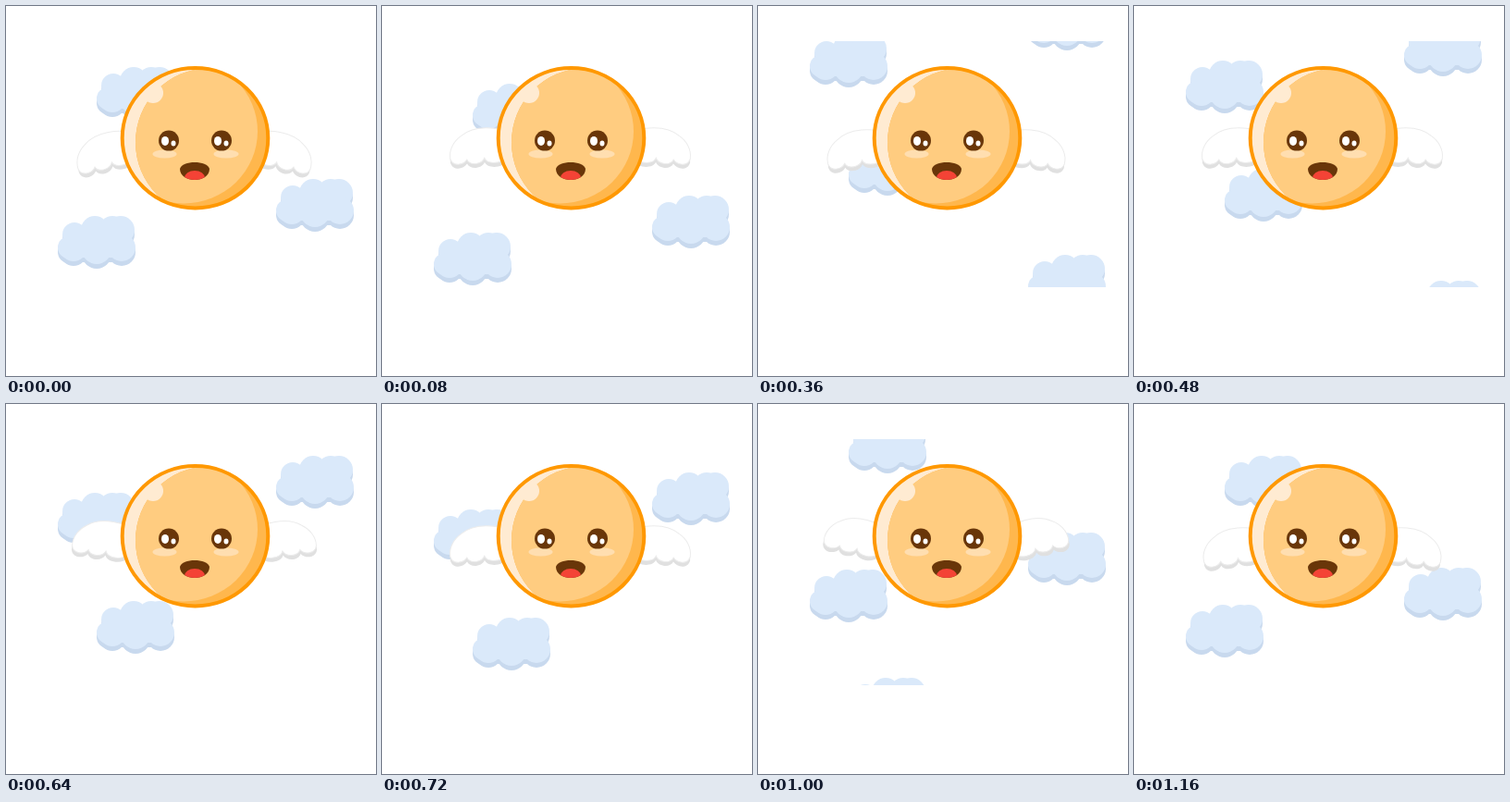
An HTML page for the animation above (1.2 s loop, 400 px wide and 400 px high).

```html
<!DOCTYPE html>
<html lang="en">
<head>
<meta charset="utf-8">
<title>Flying sun</title>
<style>
  html, body { margin: 0; width: 100%; height: 100%; overflow: hidden; background: #fff; }
  svg { display: block; width: 100vw; height: 100vh; }
</style>
</head>
<body>
<svg viewBox="0 0 400 400">
  <defs>
    <clipPath id="sky"><rect x="56" y="38" width="320" height="266"/></clipPath>
    <clipPath id="disc"><ellipse cx="204.5" cy="142.7" rx="78.5" ry="75.5"/></clipPath>
    <path id="mouth" d="M188 176C190 166.5 218 166.5 220 176C220 192 188 192 188 176Z"/>
    <clipPath id="lips"><use href="#mouth"/></clipPath>
    <g id="puff">
      <circle cx="12" cy="34" r="12"/>
      <circle cx="18" cy="20" r="13"/>
      <circle cx="40" cy="15" r="15"/>
      <circle cx="59" cy="14" r="14"/>
      <circle cx="68" cy="15" r="15"/>
      <circle cx="69" cy="34" r="15"/>
      <circle cx="42" cy="36" r="16"/>
      <circle cx="17" cy="35" r="14"/>
      <rect x="12" y="15" width="58" height="30"/>
    </g>
    <g id="cloud">
      <use href="#puff" y="5" fill="#c8d9ee"/>
      <use href="#puff" fill="#dae9fa"/>
    </g>
    <path id="feathers" d="M140 139C128 129 100 127 86 138C78 143 72 152 73 162C75 171 87 170 91 164C94 171 107 170 110 163C113 171 130 170 134 163Z"/>
    <g id="wing">
      <use href="#feathers" y="4.5" fill="#e0e0e0"/>
      <use href="#feathers" fill="#fff" stroke="#ececec"/>
    </g>
    <g id="eye">
      <circle r="11" fill="#693609"/>
      <ellipse cx="-4" cy="0.3" rx="4" ry="5" fill="#fff"/>
      <ellipse cx="5" cy="2.8" rx="2.5" ry="3" fill="#fff"/>
    </g>
  </defs>

  <g id="clouds" clip-path="url(#sky)"></g>

  <g id="left"><use href="#wing"/></g>
  <g transform="translate(407 0) scale(-1 1)"><g id="right"><use href="#wing"/></g></g>

  <g clip-path="url(#disc)">
    <rect x="120" y="60" width="170" height="165" fill="#ffebd2"/>
    <ellipse cx="219" cy="147.4" rx="79" ry="80" fill="#ffb74d"/>
    <rect x="219" y="60" width="70" height="165" fill="#ffb74d"/>
    <clipPath id="body"><path d="M219 60V67.4A79 80 0 0 0 219 227.4H300V60Z"/></clipPath>
    <ellipse cx="192" cy="135.5" rx="80" ry="78" fill="#ffcc80" clip-path="url(#body)"/>
    <circle cx="159" cy="94" r="11" fill="#ffebd2"/>
  </g>
  <ellipse cx="204.5" cy="142.7" rx="78.8" ry="75.7" fill="none" stroke="#ff9800" stroke-width="4"/>

  <ellipse cx="171.5" cy="160" rx="13" ry="4.5" fill="#ffdeb0"/>
  <ellipse cx="238" cy="160" rx="13.5" ry="4.5" fill="#ffdeb0"/>
  <use href="#eye" x="176" y="145.6"/>
  <use href="#eye" x="233" y="145.6"/>
  <use href="#mouth" fill="#693609"/>
  <ellipse cx="204" cy="186" rx="11" ry="8" fill="#f44336" clip-path="url(#lips)"/>
</svg>
<script>
  const LOOP = 1200, STEP = 40, FLAP = 400, SPAN = 278;
  const SVG = "http://www.w3.org/2000/svg";
  const byId = id => document.getElementById(id);

  // Each cloud has a copy one span above it, so it leaves and enters at once.
  const clouds = [[98, 66], [292, 187], [56, 227]].flatMap(([x, y]) =>
    [0, SPAN].map(lift => {
      const node = document.createElementNS(SVG, "use");
      node.setAttribute("href", "#cloud");
      node.setAttribute("x", x);
      byId("clouds").append(node);
      return { node, y: y - lift };
    }));

  // The fall gets slightly faster late in the loop.
  const SPEED = 0.23, LATE = 840;
  const lateSpeed = (SPAN - SPEED * LATE) / (LOOP - LATE);
  const fall = t => SPEED * Math.min(t, LATE) + lateSpeed * Math.max(t - LATE, 0);

  function draw(now) {
    const t = Math.floor((now % LOOP) / STEP) * STEP;
    const drop = Math.floor(fall(t));
    for (const { node, y } of clouds) node.setAttribute("y", y + drop);

    const phase = (t % FLAP) / FLAP;
    const lift = 1 - Math.abs(1 - 2 * phase);
    const turn = `rotate(${-13 + 26 * lift} 138 147)`;
    byId("left").setAttribute("transform", turn);
    byId("right").setAttribute("transform", turn);
  }

  const start = performance.now();
  function tick() {
    draw(performance.now() - start);
    requestAnimationFrame(tick);
  }
  tick();
</script>
</body>
</html>
```
